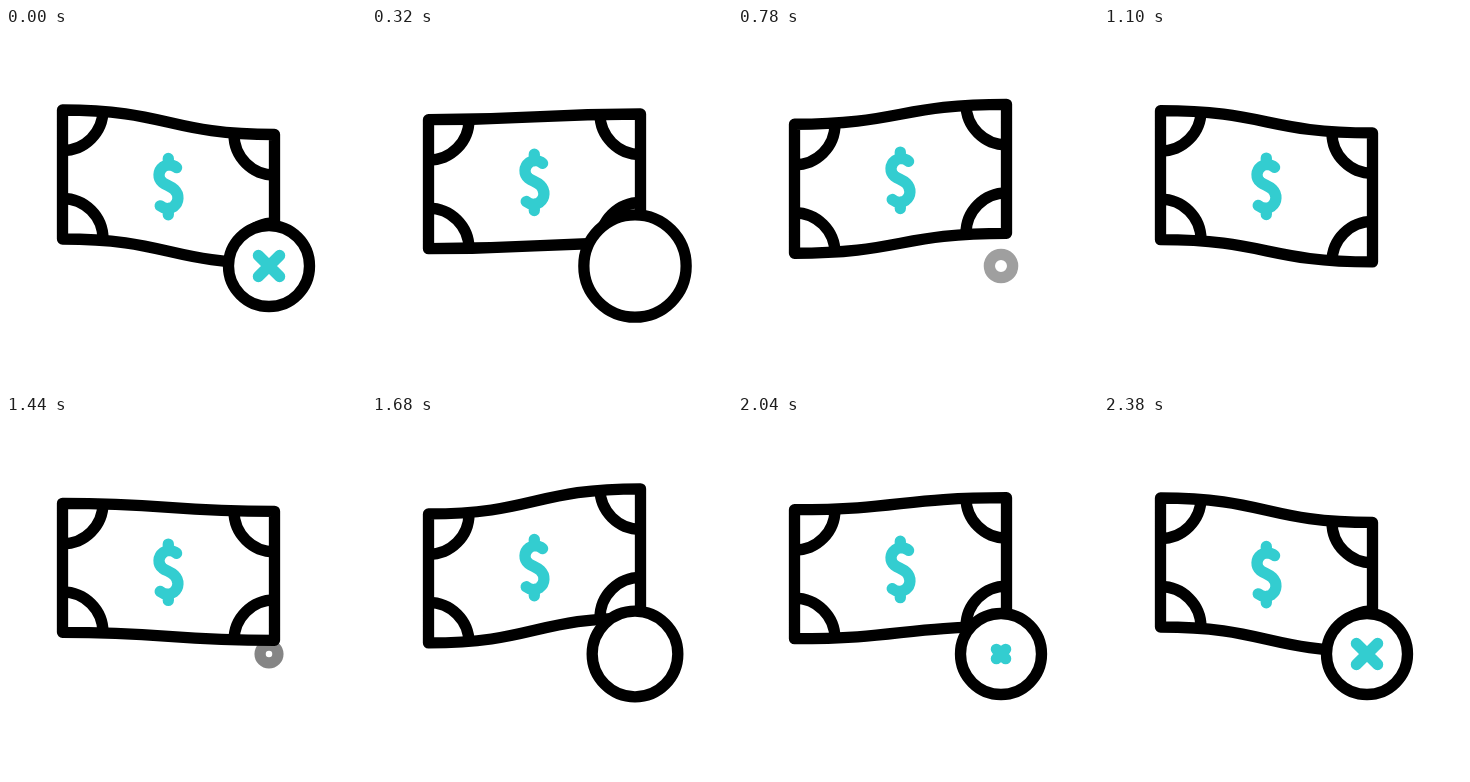
Write an HTML page that moves like this. It is 360 by 360 pixels and loops after 2.4 s.

```html
<!DOCTYPE html>
<html lang="en">
<head>
<meta charset="utf-8">
<title>Cancelled payment</title>
<style>
  html, body { margin: 0; width: 100%; height: 100%; overflow: hidden; background: #fff; }
  svg { display: block; width: 100vw; height: 100vh; }
  path, circle { fill: none; stroke: #000; stroke-width: 11.3; stroke-linejoin: round; }
  .teal { stroke: #33cdd0; stroke-width: 11.3; stroke-linecap: round; }
  #ring { fill: #fff; }
</style>
</head>
<body>
<svg viewBox="0 0 360 360">
  <path id="note"/>
  <path id="arcs"/>
  <path id="dollar" class="teal" d="M162.3 130.4V137M162.3 180.5V186.8
    M170.6 139.6C166.5 136.3 161 136 157.3 138.8C151.8 143 151.6 150.5 156.6 154.5
    C160.3 157.3 164.8 158 168.3 161.5C173.4 166.5 173.1 174.5 167.6 178.6
    C163.8 181.3 158.3 181 154.2 177.8"/>
  <g id="badge" transform="translate(263 238)">
    <circle id="ring"/>
    <path id="cross" class="teal"/>
  </g>
</svg>
<script>
const LOOP = 2400;
const L = 56.5, R = 268.5, MID = (L + R) / 2, H = 129, C = 40.5;
const $ = id => document.getElementById(id);
const note = $('note'), arcs = $('arcs'), dollar = $('dollar');
const badge = $('badge'), ring = $('ring'), cross = $('cross');

// cubic-bezier(.5, 0, .5, 1), solved by bisection
function ease(x) {
  let lo = 0, hi = 1;
  for (let i = 0; i < 24; i++) {
    const u = (lo + hi) / 2;
    if (1.5 * u * (1 - u) + u ** 3 < x) lo = u; else hi = u;
  }
  return lo * lo * (3 - 2 * lo);
}

// Eased value at time t from [time, value] steps
function track(steps, t) {
  if (t <= steps[0][0]) return steps[0][1];
  for (let i = 1; i < steps.length; i++) {
    const [t0, a] = steps[i - 1], [t1, b] = steps[i];
    if (t < t1) return a + (b - a) * ease((t - t0) / (t1 - t0));
  }
  return steps[steps.length - 1][1];
}

const WAVE = [[0, 0], [600, 1], [1200, 0], [1800, 1], [2400, 0]];
const RADIUS = [[150, 40.5], [400, 53.5], [980, 0], [1250, 0], [1860, 50.5], [2030, 40.5]];
const FADE = [[600, 1], [920, 0], [1290, 0], [1600, 1]];
const ARM = [[0, 10.6], [220, 0], [1945, 0], [2150, 10.6]];

function draw(t) {
  const w = track(WAVE, t);
  const l = 82 + 17 * w, r = 106.5 - 36 * w, lb = l + H, rb = r + H;
  note.setAttribute('d',
    `M${L} ${l}C${MID} ${l} ${MID} ${r} ${R} ${r}V${rb}C${MID} ${rb} ${MID} ${lb} ${L} ${lb}Z`);
  const arc = `A${C} ${C} 0 0 1`;
  arcs.setAttribute('d',
    `M${L + C} ${l}${arc} ${L} ${l + C}M${L} ${lb - C}${arc} ${L + C} ${lb}` +
    `M${R} ${r + C}${arc} ${R - C} ${r}M${R - C} ${rb}${arc} ${R} ${rb - C}`);
  dollar.setAttribute('transform', `translate(0 ${-7.5 * w})`);

  const rad = track(RADIUS, t), a = track(ARM, t);
  ring.setAttribute('r', rad);
  badge.setAttribute('opacity', rad > 0 ? track(FADE, t) : 0);
  cross.setAttribute('d', a > 0.05 ? `M${-a} ${-a}L${a} ${a}M${a} ${-a}L${-a} ${a}` : '');
}

const start = performance.now();
function tick(now) {
  draw(Math.max(0, now - start) % LOOP);
  requestAnimationFrame(tick);
}
draw(0);
requestAnimationFrame(tick);
</script>
</body>
</html>
```
